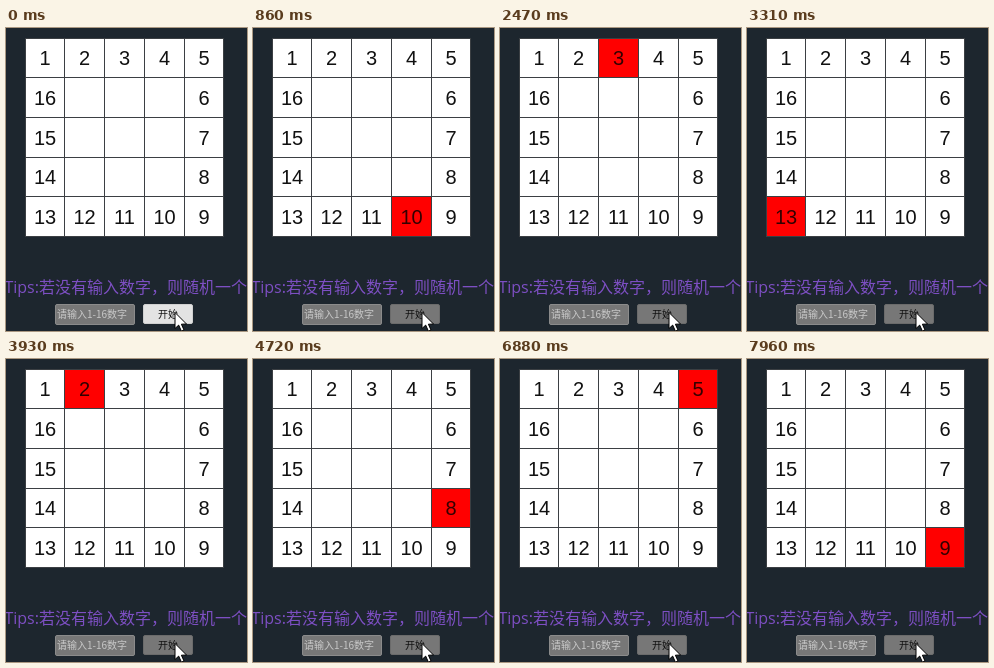
Recreate the animation shown at these times as an HTML page with a canvas. Size 241 by 303 pixels, loop 8 s.

```html
<!DOCTYPE html>
<html lang="zh">
<head>
<meta charset="utf-8">
<style>
html, body { margin: 0; width: 100%; height: 100%; overflow: hidden; background: #1d262e; }
canvas { display: block; }
</style>
</head>
<body>
<canvas id="stage"></canvas>
<script>
const W = 241, H = 303, LOOP = 8000, TICK = 120;
const canvas = document.getElementById('stage');
const ctx = canvas.getContext('2d');
const dpr = window.devicePixelRatio || 1;
canvas.width = W * dpr;
canvas.height = H * dpr;
canvas.style.width = W + 'px';
canvas.style.height = H + 'px';
ctx.scale(dpr, dpr);

const CJK = '"Noto Sans CJK SC", "Noto Sans CJK", sans-serif';
const DIGITS = '"Liberation Sans", Arial, sans-serif';
const colX = [19, 58, 98, 138, 178, 217];
const rowY = [10, 49, 89, 129, 168, 208];

// Runs of the light: start time, number of ticks, first cell, stride
const runs = [
  [360, 4, 2, 2], [860, 5, 10, 2], [1490, 3, 4, 2], [1870, 4, 10, 2],
  [2350, 5, 1, 2], [2950, 7, 10, 1], [3810, 4, 1, 1], [4330, 1, 6, 1],
  [4580, 1, 7, 1], [4720, 6, 8, 1], [5460, 3, 14, 1]
];
// The slow final lap, one cell at a time from cell 1
[5950, 6200, 6350, 6630, 6880, 7160, 7440, 7690, 7960]
  .forEach((t, i) => runs.push([t, 1, i + 1, 1]));

function litCell(t) {
  let cell = 0;
  for (const [start, count, first, stride] of runs) {
    if (t < start) break;
    const n = Math.min(count - 1, Math.floor((t - start) / TICK));
    cell = (first + n * stride - 1) % 16 + 1;
  }
  return cell;
}

// Column and row of a cell, clockwise from the top left
function place(n) {
  if (n <= 5) return [n - 1, 0];
  if (n <= 9) return [4, n - 5];
  if (n <= 13) return [13 - n, 4];
  return [0, 17 - n];
}

function rect(x, y, w, h, color) {
  ctx.fillStyle = color;
  ctx.fillRect(x, y, w, h);
}

function text(str, x, y, font, color, align = 'left') {
  ctx.font = font;
  ctx.fillStyle = color;
  ctx.textAlign = align;
  ctx.fillText(str, x, y);
}

function drawGrid(lit) {
  rect(19, 10, 199, 199, '#fff');
  if (lit) {
    const [c, r] = place(lit);
    rect(colX[c], rowY[r], colX[c + 1] - colX[c], rowY[r + 1] - rowY[r], '#f00');
  }
  for (let i = 0; i < 6; i++) {
    rect(colX[i], 10, 1, 199, '#3b3f43');
    rect(19, rowY[i], 199, 1, '#3b3f43');
  }
  for (let n = 1; n <= 16; n++) {
    const [c, r] = place(n);
    text(n, (colX[c] + colX[c + 1] + 1) / 2, (rowY[r] + rowY[r + 1]) / 2 + 7.5,
      '20px ' + DIGITS, n === lit ? '#300' : '#111', 'center');
  }
}

function box(x, y, w, h, fill, edge) {
  ctx.beginPath();
  ctx.roundRect(x + 0.5, y + 0.5, w - 1, h - 1, 1.5);
  ctx.fillStyle = fill;
  ctx.fill();
  ctx.lineWidth = 1;
  ctx.strokeStyle = edge;
  ctx.stroke();
}

function drawForm(t) {
  text('Tips:', 33, 265, '16px "Open Sans", sans-serif', '#7d4fc3', 'right');
  text('若没有输入数字，则随机一个', 33, 265, '16px ' + CJK, '#7d4fc3');
  box(49, 276, 80, 21, '#777', '#8b8b8b');
  text('请输入1-16数字', 51, 290, '10px ' + CJK, '#c9c9c9');
  const face = t < 120 ? '#e3e3e3' : t < 240 ? '#f5f5f5' : '#777';
  box(137, 276, 50, 20, face, t < 240 ? '#d0d0d0' : '#6b6b6b');
  text('开始', 162, 290, '10px ' + CJK, '#111', 'center');
}

function drawCursor() {
  const pts = [[0, 0], [0, 16], [3.7, 12.6], [6.4, 18.6], [9, 17.5], [6.4, 11.7], [11.5, 11.5]];
  ctx.beginPath();
  for (const [x, y] of pts) ctx.lineTo(169 + x, 284.5 + y);
  ctx.closePath();
  ctx.fillStyle = '#fff';
  ctx.fill();
  ctx.lineWidth = 1;
  ctx.strokeStyle = '#000';
  ctx.stroke();
}

function draw(t) {
  rect(0, 0, W, H, '#1d262e');
  drawGrid(litCell(t));
  drawForm(t);
  drawCursor();
}

const begin = performance.now();
function frame() {
  draw((performance.now() - begin) % LOOP);
  requestAnimationFrame(frame);
}
frame();
</script>
</body>
</html>
```
